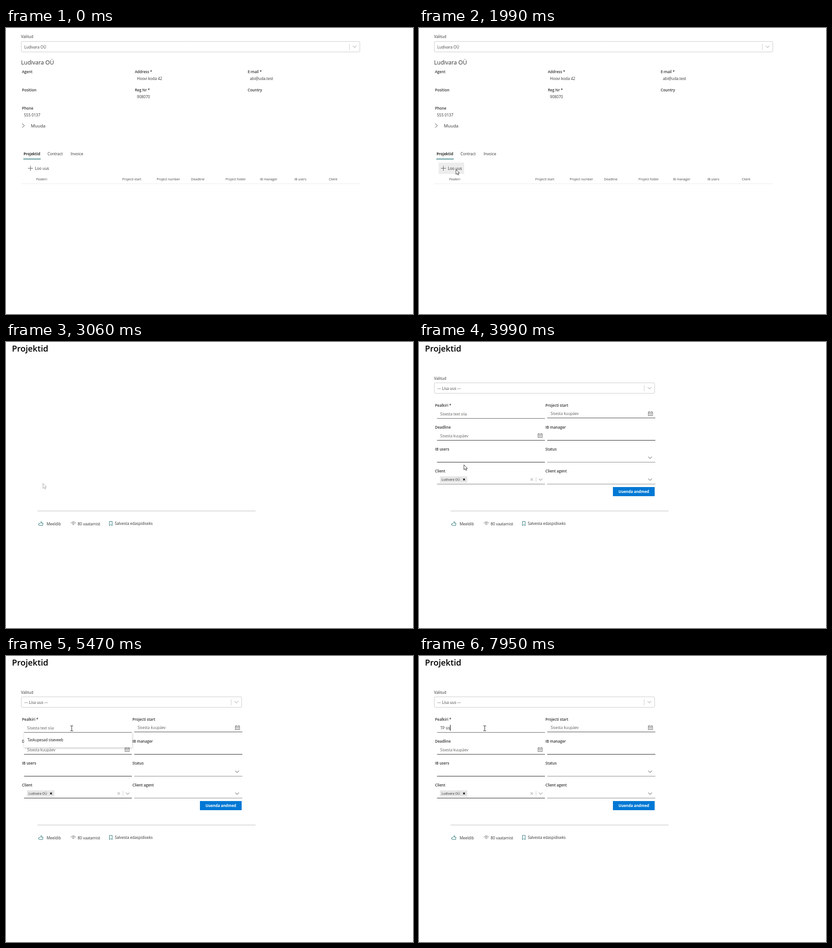
Write an HTML page with a canvas that moves like this. It is 892 by 627 pixels and loops after 8000 ms.

```html
<!DOCTYPE html>
<html lang="et">
<head>
<meta charset="utf-8">
<title>Projektid</title>
<style>
html, body { margin: 0; width: 100%; height: 100%; overflow: hidden; background: #fff; }
canvas { display: block; }
</style>
</head>
<body>
<canvas id="stage" width="892" height="627"></canvas>
<script>
const ctx = document.getElementById('stage').getContext('2d');
const LOOP = 8000;
const FONT = '"Open Sans", "Noto Sans", sans-serif';
const INK = '#323130';
const TEAL = '#17696d';
const CLIENT = 'Ludivara OÜ';

// Text is placed by its left edge and the middle of its capitals.
function text(str, x, midY, { size = 8.35, weight = 400, color = INK } = {}) {
  ctx.font = `${weight} ${size}px ${FONT}`;
  ctx.fillStyle = color;
  ctx.fillText(str, x, midY + size * 0.36);
}

function rect(x, y, w, h, color) {
  ctx.fillStyle = color;
  ctx.fillRect(x, y, w, h);
}

function line(points, color, width = 1) {
  ctx.beginPath();
  points.forEach(([x, y]) => ctx.lineTo(x, y));
  ctx.strokeStyle = color;
  ctx.lineWidth = width;
  ctx.stroke();
}

function shape(d, x, y, stroke, fill, width = 1) {
  const path = new Path2D(d);
  ctx.save();
  ctx.translate(x, y);
  if (fill) { ctx.fillStyle = fill; ctx.fill(path); }
  ctx.strokeStyle = stroke;
  ctx.lineWidth = width;
  ctx.lineJoin = 'round';
  ctx.stroke(path);
  ctx.restore();
}

function withAlpha(alpha, draw) {
  if (alpha <= 0) return;
  ctx.save();
  ctx.globalAlpha = Math.min(1, alpha);
  draw();
  ctx.restore();
}

const label = (str, x, y) => text(str, x, y, { size: 8.1, weight: 600 });
const hint = (str, x, y) => text(str, x, y, { size: 8.25, color: '#605e5c' });
const chevron = (x, y, color) =>
  line([[x - 4, y - 2], [x, y + 2], [x + 4, y - 2]], color, 1.1);

function cross(x, y, r, color, width) {
  line([[x - r, y - r], [x + r, y + r]], color, width);
  line([[x - r, y + r], [x + r, y - r]], color, width);
}

function select(x, y, w, value) {
  ctx.beginPath();
  ctx.roundRect(x + 0.5, y + 0.5, w - 1, 23, 2.5);
  ctx.strokeStyle = '#ccc';
  ctx.lineWidth = 1;
  ctx.stroke();
  text(value, x + 7, y + 12.5, { color: '#444' });
  rect(x + w - 24, y + 6, 1, 13, '#ccc');
  chevron(x + w - 12, y + 12, '#bbb');
}

function calendar(x, y) {
  const color = '#605e5c';
  ctx.strokeStyle = color;
  ctx.lineWidth = 0.8;
  ctx.strokeRect(x + 0.5, y + 1.5, 9.5, 8);
  rect(x + 0.5, y + 3.5, 9.5, 0.8, color);
  rect(x + 2, y, 1, 2, color);
  rect(x + 7.5, y, 1, 2, color);
  for (let i = 0; i < 6; i++) rect(x + 2 + (i % 3) * 2.5, y + 5.2 + (i > 2) * 2, 1.3, 1, color);
}

function clientPage(t) {
  text('Valitud', 33, 19);
  select(33, 29, 743, CLIENT);
  text(CLIENT, 33, 75.5, { size: 12.5 });

  const fields = [
    ['Agent'], ['Address *', 'Hoovi koda 42'], ['E-mail *', 'abi@uda.test'],
    ['Position'], ['Reg Nr *', '908070'], ['Country'],
    ['Phone', '555 0137'],
  ];
  fields.forEach(([name, value], i) => {
    const x = 35 + (i % 3) * 247.4;
    const y = 96 + Math.floor(i / 3) * 40.2;
    label(name, x, y);
    if (value) text(value, x + 4.6, y + 15);
  });

  line([[35.5, 209.5], [40.3, 214], [35.5, 218.5]], '#444');
  text('Muuda', 54.5, 215, { size: 9.7 });

  text('Projektid', 38.5, 276, { size: 8, weight: 700 });
  text('Contract', 91, 276);
  text('Invoice', 141.7, 276);
  rect(38, 286.6, 38, 1.4, TEAL);

  if (t >= 1050) rect(43, 295, 56, 25, t < 1870 ? '#f3f2f2' : '#ededed');
  rect(48, 307, 11, 1, '#605e5c');
  rect(53, 302, 1, 11, '#605e5c');
  text('Loo uus', 63.5, 308);

  const small = { size: 7.1, color: '#484644' };
  text('Pealkiri', 66, 331.5, small);
  ['Projecti start', 'Project number', 'Deadline', 'Project folder', 'IB manager', 'IB users', 'Client']
    .forEach((name, i) => text(name, 254.7 + i * 75.45, 331.5, small));
  rect(33, 341, 743, 1, '#edebe9');
}

function pageFrame(t) {
  text('Projektid', 13, 14.5, { size: 18.3, weight: 600, color: '#000' });
  rect(69, 370, 478, 1, '#c0c0c0');

  shape('M0 5H2.5L5 2.6V.8Q6.8 0 6.8 2L6.2 3.8H9.6L8.8 9H2.5L0 8Z', 71.5, 393.3, TEAL, null, 0.9);
  text('Meeldib', 89, 398.5);
  if (t < 3060) return;
  shape('M0 4.5C2.5 0 8.5 0 11 4.5M3.5 5.2A2 2 0 1 0 7.5 5.2A2 2 0 1 0 3.5 5.2', 142, 393.2, '#605e5c', null, 0.9);
  text('80 vaatamist', 157, 398.5);
  shape('M0 0H6V9.5L3 6.8L0 9.5Z', 226.7, 393.3, TEAL, null, 0.9);
  text('Salvesta edaspidiseks', 238.4, 398.5, { size: 8.27 });
}

function typedText(t) {
  const keyTimes = [6210, 6410, 6670, 6870, 7810, 7950];
  return 'TP sis'.slice(0, keyTimes.filter(k => t >= k).length);
}

function caretVisible(t) {
  return (t >= 4940 && t < 5470) || (t >= 6010 && t < 7470) || t >= 7810;
}

function form(t) {
  text('Valitud', 33, 79.5);
  select(33, 89, 484, '--- Lisa uus ---');

  const names = [
    ['Pealkiri *', 'Projecti start'], ['Deadline', 'IB manager'],
    ['IB users', 'Status'], ['Client', 'Client agent'],
  ];
  const lineColors = [
    ['#666', '#444'], ['#333', '#222'], ['#222', '#888'],
    [t < 4060 ? '#777' : '#222', '#888'],
  ];
  names.forEach(([left, right], i) => {
    const y = 139 + i * 48;
    label(left, 35, y);
    label(right, 277, y);
    rect(39.5, y + 28, 236.5, 1, lineColors[i][0]);
    rect(281, y + 28 - (i === 0), 237, 1, lineColors[i][1]);
  });

  hint('Sisesta kuupäev', 288.5, 157.5);
  calendar(502, 152);
  hint('Sisesta kuupäev', 46.6, 206);
  calendar(260.3, 200);
  chevron(506.5, 253.5, '#888');
  chevron(506.5, 301.5, '#888');

  const typed = typedText(t);
  if (typed) text(typed, 46.8, 158, { size: 8.25 });
  else hint('Sisesta text siia', 46.6, 158);
  if (caretVisible(t)) {
    ctx.font = `400 8.25px ${FONT}`;
    rect(Math.round(46.8 + ctx.measureText(typed).width), 151, 1, 13, '#000');
  }

  if (t >= 3540) {
    rect(46, 294.5, 60, 14, '#e6e6e6');
    text(CLIENT, 49.3, 301.7, { size: 7.05, color: '#333' });
    cross(98.7, 301.4, 1.9, '#000', 1.4);
    cross(247, 301.4, 2.7, '#bbb', 1.3);
  }
  rect(256, 296, 1, 10, '#ccc');
  chevron(266.5, 301.5, '#aaa');

  rect(425, 318, 91.5, 20, '#0078d4');
  text('Uuenda andmed', 437.3, 328, { size: 8.15, weight: 700, color: '#fff' });
}

function suggestion() {
  ctx.save();
  ctx.shadowColor = 'rgba(0,0,0,.25)';
  ctx.shadowBlur = 4;
  ctx.shadowOffsetY = 1;
  rect(39.5, 168, 237, 32.5, '#fff');
  ctx.restore();
  text('Taskupesad siseveeb', 47, 184.5, { size: 8.1, color: '#111' });
  rect(39.5, 167, 236.5, 1, '#666');
}

const cursors = {
  arrow(x, y, color) {
    shape('M0 0V11L2.6 8.7L4.3 12.4L6 11.6L4.5 8H7.6Z', x, y, color, '#fff', 0.9);
  },
  hand(x, y, color) {
    shape('M-1.2 1Q0-.8 1.2 1V5Q2.4 4.2 3.2 5.6Q4.6 4.8 5.2 6.2Q6.8 5.8 7 7.6V10.5L5.6 13V15.3H-.8V13.5L-4.2 9Q-4.2 7.2-2.4 8.2L-1.2 9.3Z',
      x, y, color, '#fff', 0.9);
  },
  beam(x, y, color) {
    shape('M-3-5.5H-1Q0-5.5 0-4.5Q0-5.5 1-5.5H3M0-4.5V4.5M-3 5.5H-1Q0 5.5 0 4.5Q0 5.5 1 5.5H3', x, y, color);
  },
};

const moves = [
  { start: 70, end: 850, steps: 13, from: [900, 650], to: [78, 362], power: 1.3 },
  { start: 930, end: 1050, steps: 3, from: [78, 362], to: [76, 305], power: 1 },
  { start: 1190, end: 1530, steps: 6, from: [76, 306], to: [81, 310], power: 1 },
  { start: 3850, end: 4590, steps: 12, from: [81, 310], to: [143, 165], power: 1.15 },
  { start: 4730, end: 4860, steps: 3, from: [143, 165], to: [144, 158.5], power: 1 },
];

function pointerAt(t) {
  const move = moves.filter(m => t >= m.start).pop();
  const { start, end, steps, from, to, power } = move;
  const done = Math.floor((t - start) / (end - start) * (steps - 1) + 0.001) + 1;
  const p = 1 - (1 - Math.min(1, done / steps)) ** power;
  return from.map((v, i) => v + (to[i] - v) * p);
}

function pointer(t) {
  if (t < 70) return;
  const [x, y] = pointerAt(t);
  const overField = t >= 3850 && y < 168;
  const kind = overField ? 'beam' : t >= 1050 && t < 1870 ? 'hand' : 'arrow';
  cursors[kind](x, y, t >= 2460 && t < 3850 ? '#999' : '#222');
}

function render(t) {
  rect(0, 0, 892, 627, '#fff');
  if (t < 2120) clientPage(t);
  if (t >= 2460) withAlpha((t - 2400) / 180, () => pageFrame(t));
  if (t >= 3340) withAlpha(t < 3400 ? 0.6 : 1, () => form(t));
  if (t >= 4940 && t < 6600) {
    withAlpha(Math.min((t - 4900) / 180, (6600 - t) / 190), suggestion);
  }
  pointer(t);
}

const began = performance.now();
function tick() {
  render((performance.now() - began) % LOOP);
  requestAnimationFrame(tick);
}
tick();
</script>
</body>
</html>
```
